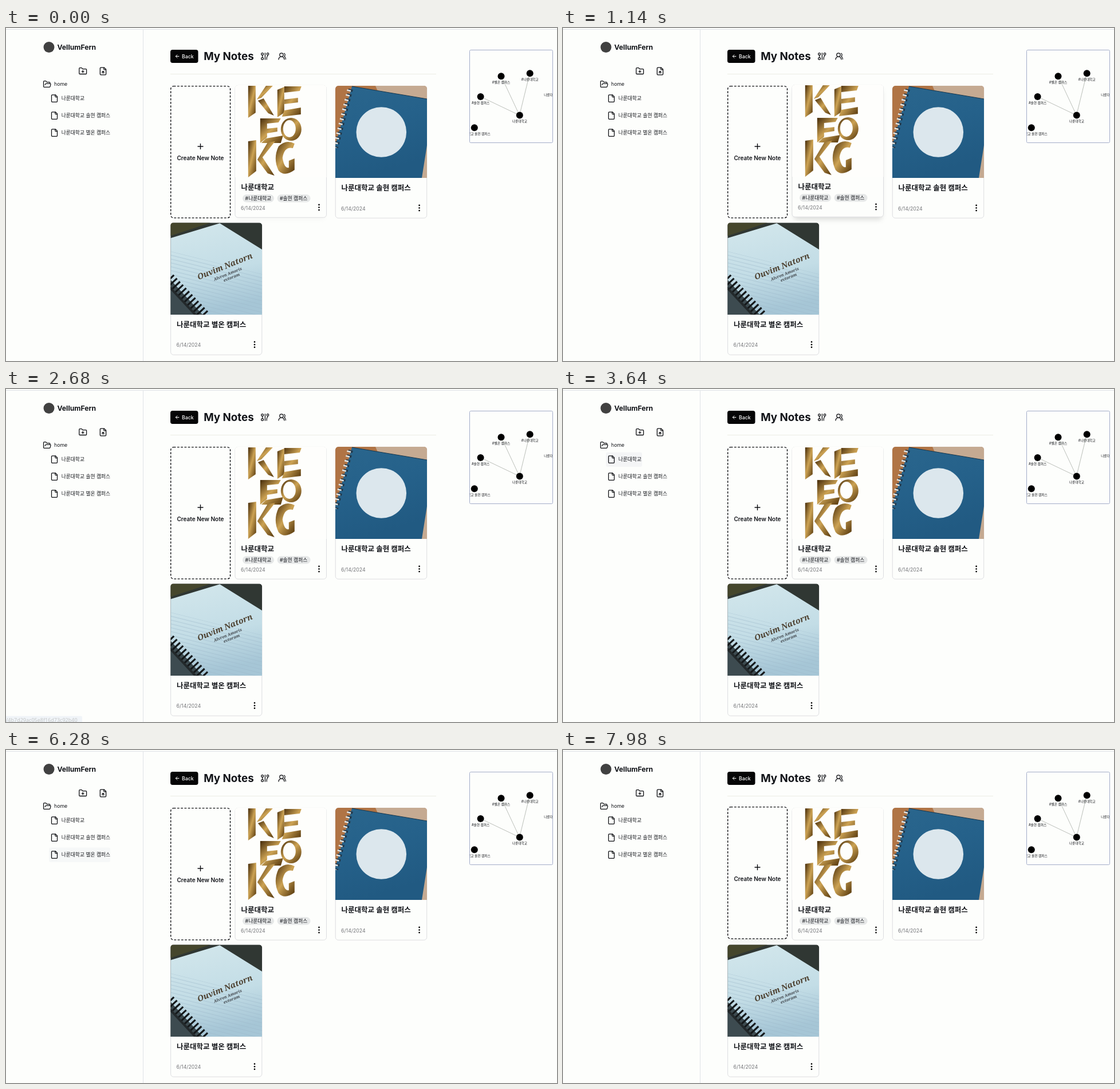
Write an HTML page that moves like this. It is 962x582 px and loops after 8000 ms.

```html
<!DOCTYPE html>
<html lang="ko">
<head>
<meta charset="utf-8">
<title>My Notes</title>
<style>
html, body { margin: 0; width: 100%; height: 100%; overflow: hidden; background: #fdfefc; }
svg { display: block; }
text { font-family: Inter, "Noto Sans CJK KR", "Noto Sans CJK", "Noto Sans CJK JP", sans-serif; font-size: 8.75px; fill: #111318; }
.icon { fill: none; stroke: #0b0c10; stroke-width: 2; stroke-linecap: round; stroke-linejoin: round; }
.title { font-size: 12.5px; font-weight: 600; }
.date { fill: #75767a; }
.card { fill: #fdfefc; stroke: #d9dadd; stroke-width: .9; }
.chip { fill: #e6e8e8; }
.shade { fill: #000; fill-opacity: .13; filter: blur(4px); opacity: 0; }
.node text { font-size: 5.7px; text-anchor: middle; }
.row { fill: #f2f4f5; opacity: 0; }
.script text { font: italic bold 14px "Noto Serif", serif; fill: #4b3e2d; }
.script .small { font-size: 7px; fill: #3d4146; }

.lift, .lift .shade, .row, .status { animation: 8s linear infinite; }
.note { animation-name: note; }
.note .shade { animation-name: noteShade; }
.create { animation-name: create; }
.create .shade { animation-name: createShade; }
.r1 { animation-name: row1; }
.r2 { animation-name: row2; }
.r3 { animation-name: row3; }
.status { opacity: 0; animation-name: status; }

@keyframes note {
  0% { transform: translateY(-1px); }
  1.5%, 20.6% { transform: translateY(-2px); }
  23.75%, 100% { transform: none; }
}
@keyframes noteShade {
  0% { opacity: .2; }
  1.8%, 20.6% { opacity: 1; }
  23.75%, 100% { opacity: 0; }
}
@keyframes create {
  0%, 20.6% { transform: none; }
  23.75%, 24.25% { transform: translateY(-2px); }
  27%, 97.5% { transform: none; }
  99.6%, 100% { transform: translateY(-2px); }
}
@keyframes createShade {
  0%, 20.6% { opacity: 0; }
  23.75%, 24.25% { opacity: .5; }
  27%, 97.5% { opacity: 0; }
  99.6%, 100% { opacity: .5; }
}
@keyframes row1 {
  0%, 45.49% { opacity: 0; }
  45.5% { opacity: .8; }
  47.5%, 57.75% { opacity: 1; }
  61%, 100% { opacity: 0; }
}
@keyframes row2 {
  0%, 59% { opacity: 0; }
  63.2%, 75.5% { opacity: 1; }
  78.3%, 100% { opacity: 0; }
}
@keyframes row3 {
  0%, 77.2% { opacity: 0; }
  78.5% { opacity: .55; }
  81%, 86% { opacity: 1; }
  90%, 100% { opacity: 0; }
}
@keyframes status {
  0%, 16.25% { opacity: 0; }
  17.5%, 30% { opacity: 1; }
  33.5% { opacity: .3; }
  36%, 100% { opacity: 0; }
}
</style>
</head>
<body>
<svg width="962" height="582" viewBox="0 0 962 582">
  <defs>
    <path id="file" d="M15 2H6a2 2 0 0 0-2 2v16a2 2 0 0 0 2 2h12a2 2 0 0 0 2-2V7ZM14 2v4a2 2 0 0 0 2 2h4"/>
    <g id="dots"><circle cy="-4.6" r="1.35"/><circle r="1.35"/><circle cy="4.6" r="1.35"/></g>
    <path id="cover" d="M0 161V5a5 5 0 0 1 5-5H155a5 5 0 0 1 5 5V161Z"/>
    <clipPath id="coverClip"><use href="#cover"/></clipPath>
    <clipPath id="graphClip"><rect x="810" y="39" width="144" height="161"/></clipPath>
    <linearGradient id="gold" x2=".9" y2="1">
      <stop offset="0" stop-color="#452b0a"/><stop offset=".5" stop-color="#cda354"/><stop offset="1" stop-color="#5c3d10"/>
    </linearGradient>
    <linearGradient id="blue" x2=".3" y2="1">
      <stop offset="0" stop-color="#2a668d"/><stop offset=".5" stop-color="#25618a"/><stop offset="1" stop-color="#215a82"/>
    </linearGradient>
    <linearGradient id="paper" x2=".2" y2="1">
      <stop offset="0" stop-color="#d3e7ec"/><stop offset=".6" stop-color="#c3dde6"/><stop offset="1" stop-color="#a6c6d6"/>
    </linearGradient>
    <pattern id="ruled" width="20" height="6.5" patternUnits="userSpaceOnUse" patternTransform="rotate(14)">
      <path d="M0 3H20" stroke="#9db8ca" stroke-width=".6"/>
    </pattern>
  </defs>

  <!-- frame lines -->
  <path d="M0 2.5H962M239.5 3V582" stroke="#dfe2e7" fill="none"/>
  <path d="M287 80.5H751" stroke="#ecede4"/>

  <!-- sidebar -->
  <circle cx="75" cy="33.5" r="9.5" fill="#414141"/>
  <text x="89.5" y="37.5" font-weight="700" style="font-size:12.2px">VellumFern</text>
  <g class="icon">
    <path transform="translate(126.5 67.7) scale(.64)" d="M12 10v6M9 13h6M20 20a2 2 0 0 0 2-2V8a2 2 0 0 0-2-2h-7.9a2 2 0 0 1-1.7-.9L9.6 3.9A2 2 0 0 0 7.9 3H4a2 2 0 0 0-2 2v13a2 2 0 0 0 2 2Z"/>
    <g transform="translate(161.8 67.8) scale(.64)"><use href="#file"/><path d="M12 12v6M15 15l-3-3-3 3"/></g>
    <path transform="translate(64.3 90.8) scale(.625)" d="M6 14l1.5-2.9A2 2 0 0 1 9.2 10H20a2 2 0 0 1 1.9 2.5l-1.5 6a2 2 0 0 1-2 1.5H4a2 2 0 0 1-2-2V5a2 2 0 0 1 2-2h3.9a2 2 0 0 1 1.7.9l.8 1.2a2 2 0 0 0 1.7.9H18a2 2 0 0 1 2 2v2"/>
  </g>
  <text x="84" y="101.2">home</text>
  <rect class="row r1" x="75" y="110.5" width="63" height="25.5" rx="3"/>
  <rect class="row r2" x="75" y="140.5" width="107" height="25.5" rx="3"/>
  <rect class="row r3" x="75" y="170.5" width="107" height="25.5" rx="3"/>
  <g class="icon">
    <use href="#file" transform="translate(77 115.5) scale(.625)"/>
    <use href="#file" transform="translate(77 145.5) scale(.625)"/>
    <use href="#file" transform="translate(77 175.5) scale(.625)"/>
  </g>
  <text x="96.7" y="126.4">나룬대학교</text>
  <text x="96.7" y="156.4">나룬대학교 솔현 캠퍼스</text>
  <text x="96.7" y="186.4">나룬대학교 별온 캠퍼스</text>

  <!-- header -->
  <rect x="287" y="38" width="48.5" height="23" rx="3.8" fill="#050506"/>
  <path d="M302.3 49.5H296.3M299.2 46.5L296.2 49.5L299.2 52.5" fill="none" stroke="#fff" stroke-width="1"/>
  <text x="307" y="52.6" font-weight="500" style="fill:#fff">Back</text>
  <text x="345.2" y="56" font-weight="700" style="font-size:18.75px">My Notes</text>
  <g class="icon" style="stroke-width:1.25">
    <circle cx="447.6" cy="45.6" r="1.9"/><circle cx="447.6" cy="53.4" r="1.9"/><circle cx="457" cy="45.4" r="1.8"/>
    <path d="M447.6 47.6V51.4M452.4 43.6V55.2M457 47.3C457 50 455.2 50 455.2 52V55"/>
  </g>
  <path class="icon" transform="translate(474.7 41.9) scale(.625)" d="M18 21a8 8 0 0 0-16 0M15 8a5 5 0 1 1-10 0a5 5 0 1 1 10 0M22 20c0-3.4-2-6.5-4-8a5 5 0 0 0-.5-8.3"/>

  <!-- create card -->
  <g class="lift create">
    <rect class="shade" x="290" y="109" width="100" height="228" rx="5"/>
    <rect x="287.7" y="101.6" width="103.8" height="230.3" rx="5" fill="#fdfefc" stroke="#0b0c10" stroke-width="1.35" stroke-dasharray="3.75 2.5"/>
    <path class="icon" style="stroke-width:1.4" d="M335 207H344M339.5 202.5V211.5"/>
    <text x="339.5" y="230.6" text-anchor="middle" font-weight="600" style="font-size:10px">Create New Note</text>
  </g>

  <!-- gold note -->
  <g class="lift note">
    <rect class="shade" x="403" y="110" width="154" height="227" rx="5"/>
    <rect class="card" x="400" y="101.4" width="159.5" height="230.8" rx="5"/>
    <g transform="translate(399.8 101)" clip-path="url(#coverClip)">
      <use href="#cover" fill="#fefefc"/>
      <g fill="url(#gold)" fill-rule="evenodd">
        <path d="M23 1H36V48L23 57Z"/>
        <path d="M40 27L50 23L68 53L58 49Z"/>
        <path d="M54 1H66L46 22L38 25Z"/>
        <path d="M74 8L86 3V48L74 56Z"/>
        <path d="M86 2H116L113 10L86 13ZM86 25L110 22V30L86 33ZM86 44L115 39V51L82 55Z"/>
        <path d="M44 58H56V91L44 101ZM56 58H80L76 65L56 67ZM56 76L74 74V81L56 84ZM54 93L84 88L80 101H46Z"/>
        <path d="M80 77A18 20 0 1 1 116 77A18 20 0 1 1 80 77ZM84 76A11 15 0 1 0 106 76A11 15 0 1 0 84 76Z"/>
        <path d="M23 98L37 96V150L23 161Z"/>
        <path d="M57 100L70 98L48 126L69 158L57 154L39 130Z"/>
        <path d="M76 107Q89 94 104 102L101 110Q86 107 83 127Q86 146 94 144V132L104 128V148Q86 161 76 149Q66 128 76 107Z"/>
      </g>
    </g>
    <text class="title" x="410.5" y="284.4">나룬대학교</text>
    <rect class="chip" x="413" y="292" width="55" height="13.5" rx="6.7"/>
    <rect class="chip" x="473.5" y="292" width="58" height="13.5" rx="6.7"/>
    <text x="417.6" y="302">#나룬대학교</text>
    <text x="478" y="302">#솔현 캠퍼스</text>
    <text class="date" x="410" y="318.6">6/14/2024</text>
    <use href="#dots" x="546.5" y="314.5"/>
  </g>

  <!-- blue note -->
  <rect class="card" x="575.2" y="101.4" width="159.5" height="230.8" rx="5"/>
  <g transform="translate(575 101)" clip-path="url(#coverClip)">
    <use href="#cover" fill="#b07445"/>
    <path d="M70 0H160V161H140Z" fill="#c5aa92"/>
    <path d="M29 1L160 23V104L151 161H0V104Z" fill="url(#blue)"/>
    <path d="M29 1L160 23" stroke="#18384f" stroke-width="1.2"/>
    <path d="M27 6L1 108" stroke="#22384a" stroke-width="8" stroke-dasharray="4 4.6"/>
    <path d="M24 7L-1 108" stroke="#dfe3e2" stroke-width="7" stroke-dasharray="2.6 6"/>
    <circle cx="80.3" cy="81" r="43.8" fill="#dce7ed"/>
  </g>
  <text class="title" x="585.5" y="284.4">나룬대학교 솔현 캠퍼스</text>
  <text class="date" x="585" y="318.6">6/14/2024</text>
  <use href="#dots" x="721.6" y="314.5"/>

  <!-- paper note -->
  <rect class="card" x="287.6" y="340.6" width="159.2" height="230.6" rx="5"/>
  <g transform="translate(287.2 340.2)" clip-path="url(#coverClip)">
    <use href="#cover" fill="#303733"/>
    <path d="M0 0H70L40 10L0 23Z" fill="#45462c"/>
    <path d="M0 27L86 1L160 47V161H56L0 100Z" fill="url(#paper)"/>
    <path d="M0 50L160 90V161H56L0 100Z" fill="url(#ruled)"/>
    <path d="M0 100L56 161H0Z" fill="#3d4b50"/>
    <path d="M-2 97L60 163" stroke="#15191b" stroke-width="19" stroke-dasharray="3.2 4.6"/>
    <path d="M-6 108L50 168" stroke="#23292b" stroke-width="4"/>
    <g class="script" transform="translate(49 100) rotate(-22)">
      <text>Ouvim Natorn</text>
      <text class="small" x="25" y="12">Alvren Amoris</text>
      <text class="small" x="40" y="20">evtoram</text>
    </g>
  </g>
  <text class="title" x="298" y="523.4">나룬대학교 별온 캠퍼스</text>
  <text class="date" x="297.5" y="557.4">6/14/2024</text>
  <use href="#dots" x="434" y="553.3"/>

  <!-- graph -->
  <rect x="809.5" y="38.5" width="145" height="162" rx="2" fill="none" stroke="#a3acc9"/>
  <g class="node" clip-path="url(#graphClip)">
    <path d="M864.5 84L896.5 152.5L914.5 79M828.5 120L896.5 152.5" fill="none" stroke="#b4b8b2" stroke-width=".9"/>
    <circle cx="864.5" cy="84.3" r="6"/><text x="864.5" y="97.4">#별온 캠퍼스</text>
    <circle cx="914.7" cy="79.2" r="6"/><text x="914.7" y="92.2">#나룬대학교</text>
    <circle cx="828.6" cy="120" r="6"/><text x="828.6" y="133.2">#솔현 캠퍼스</text>
    <circle cx="896.8" cy="152.5" r="6"/><text x="896.8" y="165.4">나룬대학교</text>
    <circle cx="817.8" cy="174.3" r="6"/><text x="818" y="187.3">나룬대학교 솔현 캠퍼스</text>
    <text x="967" y="119.2">나룬대학교 별온 캠퍼스</text>
  </g>

  <!-- link hint -->
  <g class="status">
    <path d="M0 571.5H131a2 2 0 0 1 2 2V582H0Z" fill="#d3e0f1"/>
    <text x="0" y="581.6" style="font:9px 'Noto Sans',sans-serif;fill:#45494f">/4b7d29ac05e8f16d73c92b40</text>
  </g>
</svg>
</body>
</html>
```
